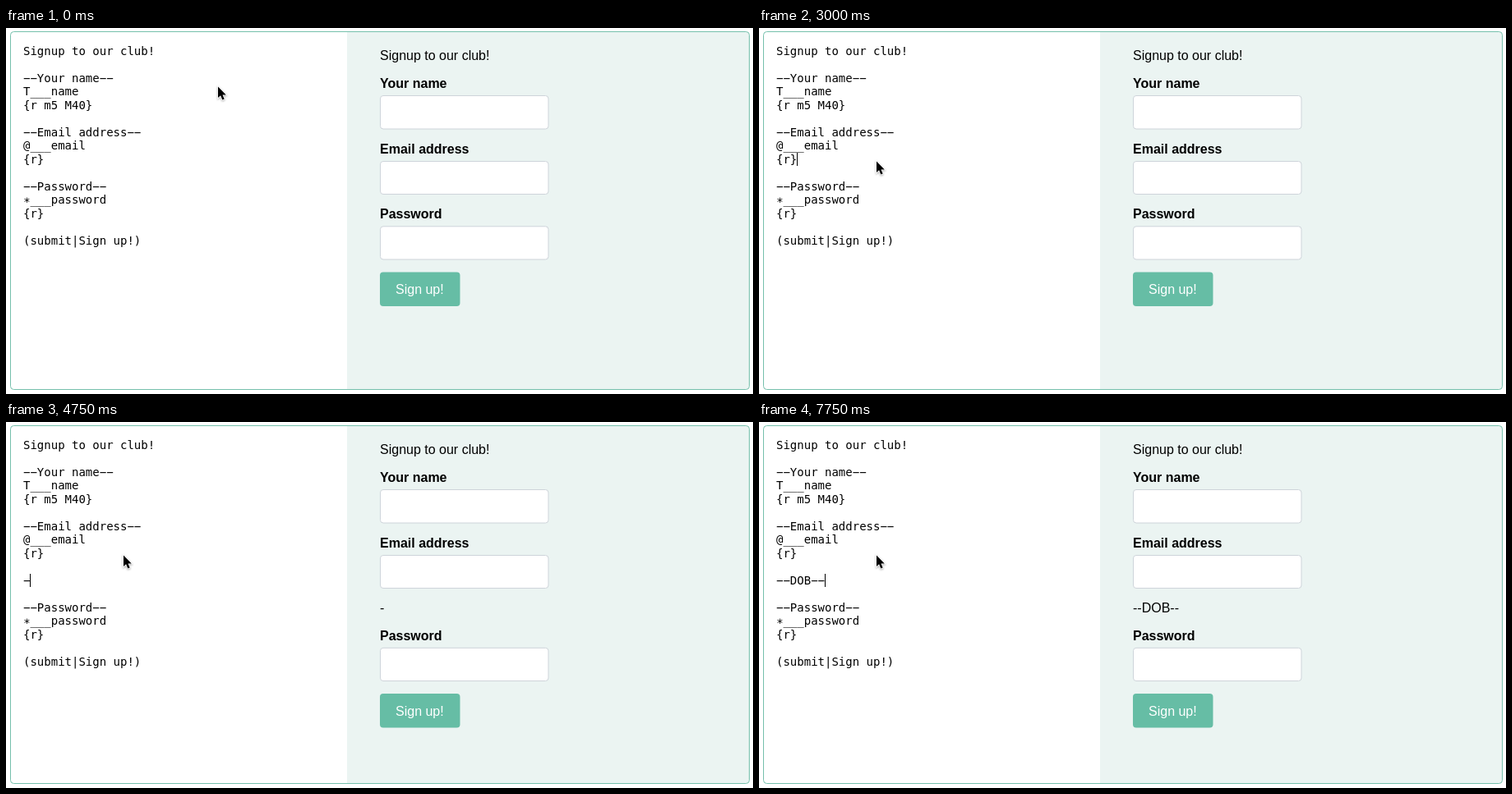
Write an HTML page that moves like this. It is 909x446 px and loops after 8 s.

```html
<!DOCTYPE html>
<html lang="en">
<head>
<meta charset="utf-8">
<title>Form markup with live preview</title>
<style>
html, body { margin: 0; height: 100%; overflow: hidden; background: #fff; }
svg { display: block; width: 909px; height: 446px; }
text { white-space: pre; }
#editor { font: 14px "DejaVu Sans Mono", monospace; }
#preview { font: 16px "Liberation Sans", Arial, sans-serif; }
.label { font-weight: bold; }
.field { fill: #fff; stroke: #ced4da; }
</style>
</head>
<body>
<svg viewBox="0 0 909 446">
  <path d="M415 4.5H900.5a4 4 0 0 1 4 4V436.5a4 4 0 0 1-4 4H415Z" fill="#ebf4f2"/>
  <rect x="5.5" y="4.5" width="899" height="436" rx="4" fill="none" stroke="#75c0ac"/>
  <rect id="selection" x="21" y="168.5" width="8.5" height="16.5" fill="#b3d7ff"/>
  <g id="editor"></g>
  <rect id="caret" width="1" height="16" fill="#000"/>
  <g id="preview">
    <text x="455" y="39">Signup to our club!</text>
    <text class="label" x="455" y="73">Your name</text>
    <rect class="field" x="455.5" y="82.5" width="204.5" height="40.5" rx="3.5"/>
    <text class="label" x="455" y="153">Email address</text>
    <rect class="field" x="455.5" y="162.5" width="204.5" height="40" rx="3.5"/>
    <text id="echo" x="455" y="232"></text>
    <g id="lower">
      <text class="label" x="455" y="232">Password</text>
      <rect class="field" x="455.5" y="241.8" width="204.5" height="40.2" rx="3.5"/>
      <rect x="455" y="297.5" width="97.5" height="41.5" rx="4" fill="#66bda5"/>
      <text x="474" y="324" fill="#fff">Sign up!</text>
    </g>
  </g>
  <path id="mouse" d="M0 0V13.6L3.1 10.8L5.3 16L7.7 15L5.5 9.9H9.8Z" stroke="#fff" stroke-width="1.6"
        paint-order="stroke" style="filter:drop-shadow(0 1px 1px #0005)"/>
</svg>
<script>
const LOOP = 8000, LEFT = 21, TOP = 20, LINE = 16.5, CHAR = 8.43;
const HEAD = ['Signup to our club!', '', '--Your name--', 'T___name', '{r m5 M40}', '',
  '--Email address--', '@___email', '{r}'];
const TAIL = ['--Password--', '*___password', '{r}', '', '(submit|Sign up!)'];
const $ = id => document.getElementById(id);

// Each step changes only the listed parts; caret is [row, column] or null.
const STEPS = [
  [0, { mouse: [258, 71.5], caret: null, selected: false, blanks: 1, typed: '' }],
  [250, { mouse: [145.5, 151.5] }],
  [500, { mouse: [129.5, 172] }],
  [750, { mouse: [128, 173.5], caret: [8, 3] }],
  [1250, { caret: null, selected: true }],
  [2000, { caret: [9, 0], selected: false }],
  [2500, { caret: null }],
  [2750, { mouse: [143, 162.5] }],
  [3000, { caret: [8, 3] }],
  [3500, { caret: [9, 0], blanks: 2 }],
  [3750, { caret: [10, 0], blanks: 3 }],
  [4250, { caret: null }],
  [4750, { caret: [10, 1], typed: '-' }],
  [5000, { caret: [10, 2], typed: '--' }],
  [5250, { caret: null }],
  [5500, { caret: [10, 3], typed: '--D' }],
  [6000, { caret: null }],
  [6250, { caret: [10, 4], typed: '--DO' }],
  [6500, { caret: [10, 5], typed: '--DOB' }],
  [7000, { caret: null }],
  [7500, { caret: [10, 6], typed: '--DOB-' }],
  [7750, { caret: [10, 7], typed: '--DOB--' }],
];

// Wide dashes and a centred asterisk, as in the editor's typeface.
const glyphs = s => s.replace(/-/g, '\u2212').replace(/\*/g, '\u2217');

function draw({ mouse, caret, selected, blanks, typed }) {
  const middle = Array(blanks).fill('');
  if (typed) middle[1] = typed;
  $('editor').innerHTML = [...HEAD, ...middle, ...TAIL].map((line, row) =>
    `<text x="${LEFT}" y="${Math.floor(TOP + 13 + row * LINE)}">${glyphs(line)}</text>`).join('');

  $('selection').style.display = selected ? '' : 'none';
  $('caret').style.display = caret ? '' : 'none';
  if (caret) {
    $('caret').setAttribute('x', Math.floor(LEFT + caret[1] * CHAR));
    $('caret').setAttribute('y', Math.round(TOP + caret[0] * LINE));
  }
  $('echo').textContent = typed;
  $('lower').setAttribute('transform', `translate(0 ${typed ? 33.5 : 0})`);
  $('mouse').setAttribute('transform', `translate(${mouse})`);
}

let shown = -1;
const start = performance.now();
function tick() {
  const time = (performance.now() - start) % LOOP;
  const current = STEPS.filter(([at]) => at <= time);
  if (current.length !== shown) {
    shown = current.length;
    draw(Object.assign({}, ...current.map(step => step[1])));
  }
  requestAnimationFrame(tick);
}
tick();
</script>
</body>
</html>
```
